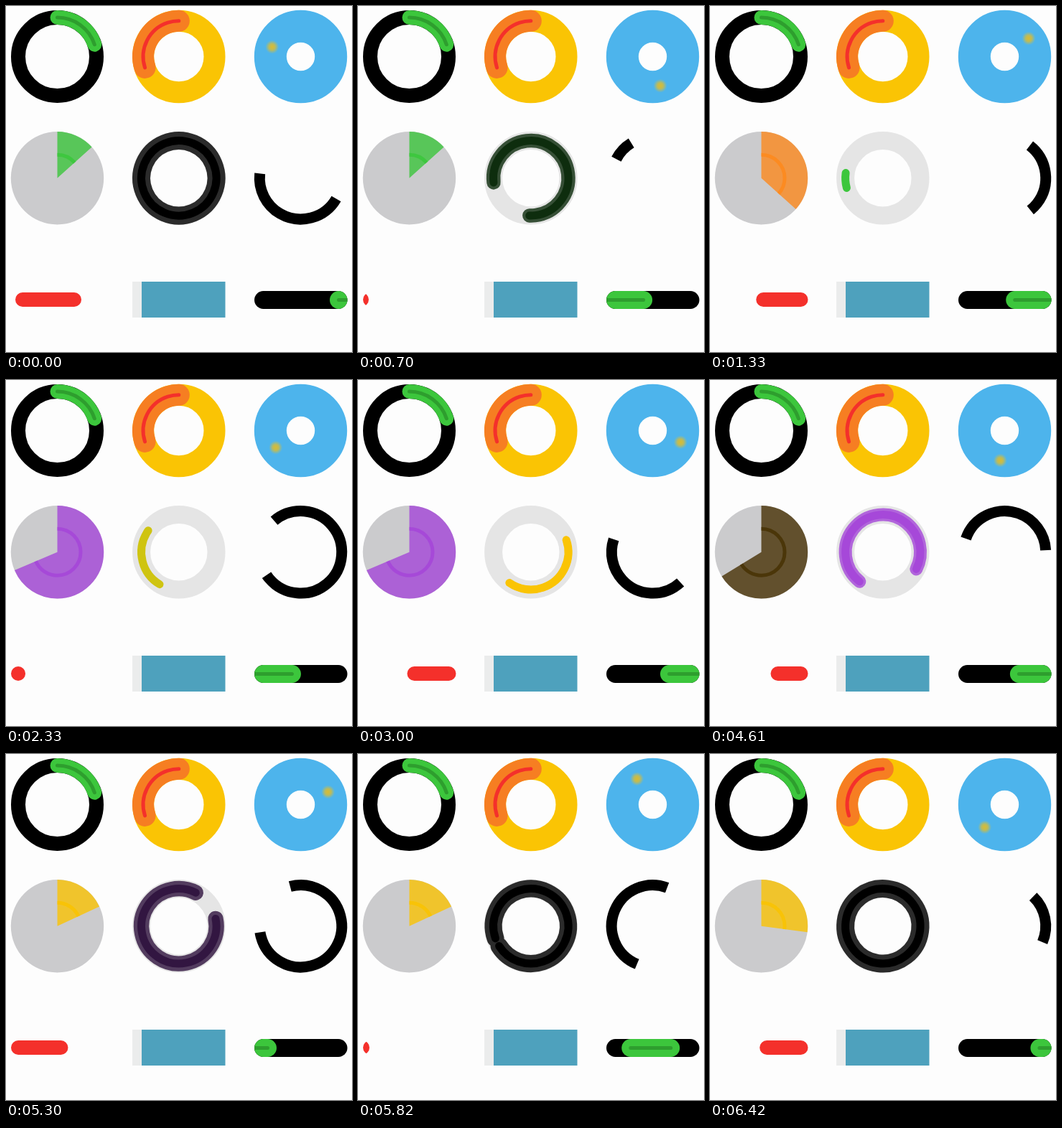
An HTML page with a canvas that plays this animation: 482x482 px, repeating every 6.45 s.

```html
<!DOCTYPE html>
<html lang="en">
<head>
<meta charset="utf-8">
<title>Progress indicators</title>
<style>
html, body { margin: 0; width: 100%; height: 100%; overflow: hidden; background: #fdfdfd; }
canvas { display: block; width: 482px; height: 482px; }
</style>
</head>
<body>
<canvas id="stage"></canvas>
<script>
const SIZE = 482, LOOP = 6450, STEP = 30;
const GREEN = [60, 198, 60], YELLOW = [250, 196, 4], ORANGE = [246, 126, 34],
      PURPLE = [166, 72, 217], BLACK = [0, 0, 0];
const LEVELS = [GREEN, YELLOW, ORANGE, PURPLE, BLACK];

// Pie moves: start, duration, sweep in degrees, colour
const PIE = [
  [-400, 400, 48, GREEN],
  [720, 300, 132, [253, 138, 30]],
  [2000, 300, 247, PURPLE],
  [3345, 350, 294, [16, 5, 7]],
  [4510, 330, 65, YELLOW],
  [5900, 300, 97.5, YELLOW]
];

const canvas = document.getElementById('stage');
const ctx = canvas.getContext('2d');
const scale = window.devicePixelRatio || 1;
canvas.width = canvas.height = SIZE * scale;

const clamp = x => Math.max(0, Math.min(1, x));
const mod = (a, n) => ((a % n) + n) % n;
const lerp = (a, b, k) => a + (b - a) * k;
const mix = (a, b, k) => a.map((v, i) => lerp(v, b[i], k));
const rgb = (c, alpha = 1) => `rgba(${c.map(Math.round).join()},${alpha})`;

// Angles in degrees, clockwise from the top
const rad = deg => (deg - 90) * Math.PI / 180;

function arc(x, y, r, from, sweep, width, color, cap = 'butt') {
  ctx.beginPath();
  ctx.arc(x, y, r, rad(from), rad(from + Math.min(sweep, 360)));
  ctx.lineWidth = width;
  ctx.lineCap = cap;
  ctx.strokeStyle = color;
  ctx.stroke();
}

function disc(x, y, r, color) {
  ctx.beginPath();
  ctx.arc(x, y, r, 0, 2 * Math.PI);
  ctx.fillStyle = color;
  ctx.fill();
}

function pill(x, y, w, h) {
  const r = h / 2;
  ctx.beginPath();
  ctx.arc(x + r, y + r, r, Math.PI / 2, Math.PI * 1.5);
  ctx.arc(x + w - r, y + r, r, -Math.PI / 2, Math.PI / 2);
  ctx.closePath();
}

function fixedRings() {
  arc(71.5, 70.5, 54.5, 0, 360, 20, '#000');
  arc(71.5, 70.5, 54.5, 0, 72, 20, rgb(GREEN), 'round');
  arc(71.5, 70.5, 54.5, 0, 72, 5, '#2e9e2e', 'round');

  arc(240.8, 70.5, 49.7, 0, 360, 30, rgb(YELLOW));
  arc(240.8, 70.5, 49.7, 252, 108, 30, rgb(ORANGE), 'round');
  arc(240.8, 70.5, 49.7, 252, 108, 5, '#f4302b', 'round');
}

function orbit(t) {
  arc(410.5, 70.5, 42.2, 0, 360, 45, '#4db4ec');
  const a = rad(288.7 - 0.1787 * t);
  const x = 410.5 + 42 * Math.cos(a), y = 70.5 + 42 * Math.sin(a);
  const glow = ctx.createRadialGradient(x, y, 0, x, y, 9.5);
  glow.addColorStop(0, 'rgba(218,188,48,1)');
  glow.addColorStop(0.45, 'rgba(208,188,64,.85)');
  glow.addColorStop(1, 'rgba(190,190,90,0)');
  disc(x, y, 9.5, glow);
}

function pie(t) {
  let sweep = 48, color = GREEN;
  for (const [start, time, target, hue] of PIE) {
    const k = clamp((t - start) / time);
    sweep = lerp(sweep, target, k);
    color = mix(color, hue, k);
  }
  disc(71.5, 239.8, 64.7, '#cbcbcd');
  arc(71.5, 239.8, 32.35, 0, sweep, 64.7, rgb(color, 0.8));
  arc(71.5, 239.8, 32.5, 0, sweep, 5, rgb(color, 0.9));
}

function growingRing(t) {
  let v = (t - 1000) / 5000, color;
  if (t < 1000) {
    const k = clamp((t - 600) / 400);
    v = 1 - k;
    color = mix(BLACK, GREEN, k);
  } else {
    v = clamp(v);
    const level = Math.min(4, Math.floor(v * 5));
    color = mix(LEVELS[Math.max(0, level - 1)], LEVELS[level], clamp((v - level / 5) / 0.08));
  }
  arc(240.8, 239.8, 52.2, 0, 360, 25, '#e5e5e5');
  if (v < 0.001) return;
  const sweep = 360 * v;
  const from = 270 + 0.3551 * (t - 1330) - sweep / 2;
  arc(240.8, 239.8, 52.2, from, sweep, 25 * v, rgb(color, 0.81), 'round');
  arc(240.8, 239.8, 52.2, from, sweep, 11, rgb(color), 'round');
}

function spinner(t) {
  const half = 1485;
  const phase = mod(t - 805, 2 * half);
  const sweep = 10 + 270 * (1 - Math.abs(phase - half) / half);
  const middle = 198.2 - 0.3551 * t;
  arc(410.5, 239.8, 57.2, middle - sweep / 2, sweep, 15, '#000');
}

function redBar(t) {
  const w = 92, travel = 223.5;
  const x = -85 + mod(98 - 0.1305 * t, travel);
  ctx.save();
  pill(7, 399, 129.5, 20);
  ctx.clip();
  pill(x, 399, w, 20);
  ctx.fillStyle = '#f4302b';
  ctx.fill();
  ctx.restore();
}

function tealBar() {
  ctx.fillStyle = '#ebecec';
  ctx.fillRect(176, 384, 13, 50);
  ctx.fillStyle = '#4ea1bd';
  ctx.fillRect(189, 384, 116.5, 50);
}

function greenBar(t) {
  const w = 81, travel = 213;
  const x = 263 + mod(188 + 0.132 * t, travel);
  ctx.save();
  pill(346, 397, 129.5, 25);
  ctx.fillStyle = '#000';
  ctx.fill();
  ctx.clip();
  pill(x, 397, w, 25);
  ctx.fillStyle = rgb(GREEN);
  ctx.fill();
  pill(x + 10, 407, w - 20, 5);
  ctx.fillStyle = '#2e9e2e';
  ctx.fill();
  ctx.restore();
}

const origin = performance.now();

function draw(now) {
  const t = Math.floor(mod(now - origin, LOOP) / STEP) * STEP;
  ctx.setTransform(scale, 0, 0, scale, 0, 0);
  ctx.fillStyle = '#fdfdfd';
  ctx.fillRect(0, 0, SIZE, SIZE);
  fixedRings();
  orbit(t);
  pie(t);
  growingRing(t);
  spinner(t);
  redBar(t);
  tealBar();
  greenBar(t);
  requestAnimationFrame(draw);
}

draw(origin);
</script>
</body>
</html>
```
